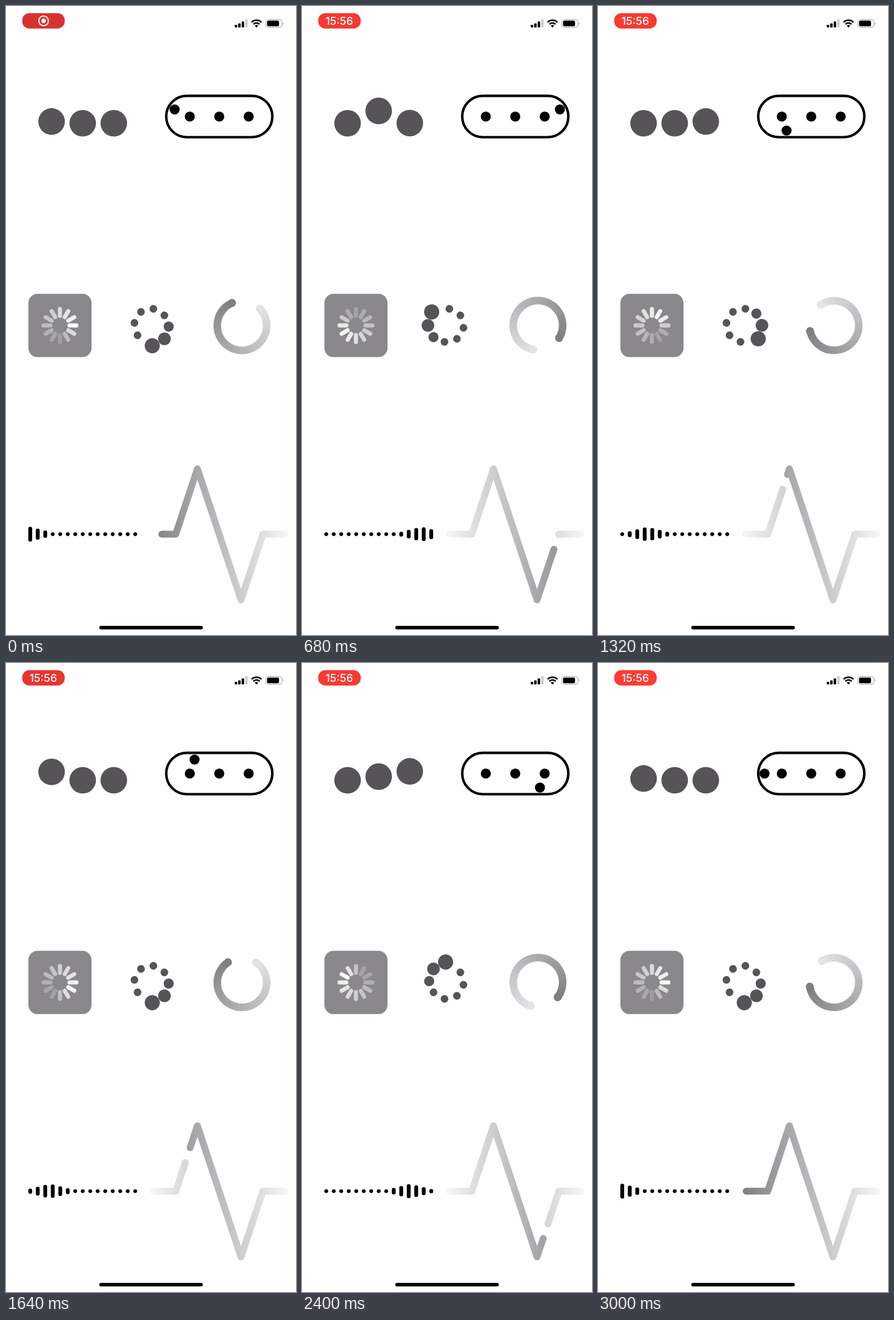
An HTML page without scripts for the animation above (3040 ms loop, 509 px wide and 1101 px high).

```html
<!DOCTYPE html>
<html lang="en">
<head>
<meta charset="utf-8">
<title>Loading indicators</title>
<style>
@property --t { syntax: "<number>"; inherits: true; initial-value: 0; }
/* Integers round, which gives floor() after subtracting a half */
@property --lap { syntax: "<integer>"; inherits: true; initial-value: 0; }
@property --tick { syntax: "<integer>"; inherits: true; initial-value: 0; }
@property --wrap { syntax: "<integer>"; inherits: false; initial-value: 0; }

html, body { margin: 0; width: 100%; height: 100%; overflow: hidden; background: #fefdff; }
body { position: relative; animation: clock 3.04s steps(76) -2ms infinite; }
@keyframes clock { to { --t: 3040; } }

svg {
  position: absolute; left: 0; top: 0; width: 509px; height: 1101px;
  --lap: calc(var(--t) / 1500 - .4999);
  --p: calc(var(--t) / 1500 - var(--lap));
  --tick: calc((var(--t) + 27) / 187.5 - .5);
  /* 0 to 1 and back */
  --swing: min(2 * var(--p), 2 - 2 * var(--p));
}

/* Status bar */
.pill { animation: glow 3.04s linear infinite; }
@keyframes glow {
  0%, 63% { fill: #d8322f; }
  13% { fill: #e93630; }
  30%, 100% { fill: #ff3b30; }
  43% { fill: #fa3930; }
  79% { fill: #f83930; }
}
.rec { animation: show 3.04s step-end infinite; }
.time {
  font: 500 19px Inter, "Liberation Sans", sans-serif;
  text-anchor: middle; fill: #fff;
  animation: show 3.04s step-end infinite reverse;
  animation: hide 3.04s step-end infinite;
}
@keyframes show { 0% { opacity: 1; } 6.58% { opacity: 0; } }
@keyframes hide { 0% { opacity: 0; } 6.58% { opacity: 1; } }

/* Bouncing balls */
.hop {
  cx: calc(80px + var(--i) * 54.6px); cy: 205.2px; r: 23.3px; fill: #565457;
  --x: calc(var(--p) * 1500 - var(--i) * 375 - 285);
  --gap: max(var(--x), -1 * var(--x));
  --d: min(var(--gap), 1500 - var(--gap), 377);
  transform: translateY(calc((1 + cos(var(--d) / 377 * 180deg)) * -10.85px));
}

/* Dot weaving around three others */
.weave {
  offset-path: path("M292.3 193.5A30.3 25.9 0 0 1 322.6 167.6A25.85 25.9 0 0 1 348.45 193.5A25.85 25.9 0 0 0 400.15 193.5A25.85 25.9 0 0 1 426 167.6A30.3 25.9 0 0 1 456.3 193.5A30.3 25.9 0 0 1 426 219.4A25.85 25.9 0 0 1 400.15 193.5A25.85 25.9 0 0 0 348.45 193.5A25.85 25.9 0 0 1 322.6 219.4A30.3 25.9 0 0 1 292.3 193.5Z");
  offset-rotate: 0deg;
  animation: weave 1.52s steps(38) -42ms infinite;
}
@keyframes weave { from { offset-distance: 0%; } to { offset-distance: 100%; } }

/* Petal spinner: slow fade out, quick fade in */
.petal {
  x: 13.3px; y: -3.6px; width: 19.2px; height: 7.2px; rx: 3.6px; fill: #fff;
  --wrap: calc(var(--p) - var(--i) / 12 - .4999);
  --q: calc(var(--p) - var(--i) / 12 - var(--wrap));
  transform: rotate(calc(var(--i) * 30deg));
  opacity: calc(.18 + .78 * max(1 - var(--q) / .75, var(--q) * 4 - 3));
}

/* Ring of dots: the head and two followers swell */
.bead {
  --wrap: calc((var(--tick) - var(--i)) / 8 - .45);
  --age: calc(var(--tick) - var(--i) - 8 * var(--wrap));
  --grow: max(0, 6.6 - 2.2 * var(--age));
  transform: rotate(calc(98.4deg + var(--i) * 45deg));
  cx: calc(29.3px + var(--grow) * .843px);
  cy: calc(var(--grow) * -1.135px);
  r: calc(6.7px + var(--grow) * 1px);
  fill: #565457;
}

/* Open ring */
.ring {
  position: absolute; left: 364.1px; top: 508.8px; width: 100.4px; height: 100.4px;
  border-radius: 50%;
  background:
    radial-gradient(circle, #fefdff 36.3px, transparent 37px),
    conic-gradient(from 90deg, transparent 70deg, #e3e2e4 70deg, #807e81 360deg);
  transform: rotate(calc(-113.7deg + var(--t) * .2128deg + max(0, var(--t) - 2400) * .0097deg));
}
.ring::before, .ring::after {
  content: ""; position: absolute; left: 43.3px; top: 43.3px;
  width: 13.8px; height: 13.8px; border-radius: 50%;
}
.ring::before { background: #807e81; transform: translateX(43.3px); }
.ring::after { background: #e3e2e4; transform: rotate(70deg) translateX(43.3px); }

/* Sound bars */
.bar {
  --x: calc(var(--swing) * 14 - var(--i));
  --h: calc(6.3 + 6.5 * max(0, 3 - max(var(--x), -1 * var(--x))));
  x: calc(39.2px + var(--i) * 13.16px); y: calc(924.5px - var(--h) * .5px);
  width: 6.7px; height: calc(var(--h) * 1px); rx: 3.2px;
}

/* Pulse line: two strokes either side of a travelling gap */
.pulse {
  fill: none; stroke-width: 12; stroke-linecap: round; stroke-linejoin: round;
  stroke-dasharray: 600 600;
  --mid: calc(var(--swing) * 560);
  --half: min(13.5, max(0, 3000 - var(--t)));
}
.before { stroke: url(#darken); stroke-dashoffset: calc(600px - (var(--mid) - var(--half)) * 1px); }
.after { stroke: url(#lighten); stroke-dashoffset: calc((var(--mid) + var(--half)) * -1px); }
</style>
</head>
<body>
<svg viewBox="0 0 509 1101">
  <defs>
    <linearGradient id="lighten" gradientUnits="userSpaceOnUse" x1="258" x2="491" y1="0" y2="0">
      <stop stop-color="#838184"/><stop offset="1" stop-color="#f4f3f5"/>
    </linearGradient>
    <linearGradient id="darken" gradientUnits="userSpaceOnUse" x1="258" x2="491" y1="0" y2="0">
      <stop stop-color="#f4f3f5"/><stop offset="1" stop-color="#838184"/>
    </linearGradient>
    <path id="beat" d="M260 924.5H298L336 810L412.5 1039.5L451 924.5H489"/>
  </defs>

  <rect class="pill" x="28.5" y="12.5" width="74.5" height="27" rx="12.5"/>
  <g class="rec">
    <circle cx="66" cy="26" r="8.4" fill="none" stroke="#fff" stroke-width="2"/>
    <circle cx="66" cy="26" r="3.9" fill="#fff"/>
  </g>
  <text class="time" x="65.5" y="32.8">15:56</text>

  <rect x="401.5" y="33" width="4.3" height="4.5" rx="1"/>
  <rect x="407.5" y="30.5" width="4.3" height="7" rx="1"/>
  <rect x="413.6" y="27" width="4.3" height="10.5" rx="1"/>
  <rect x="419.7" y="23" width="4.3" height="14.5" rx="1" fill="#cbcacc"/>
  <g fill="none" stroke="#000" stroke-width="2.8">
    <path d="M431.1 28.6A12 12 0 0 1 448.3 28.6"/>
    <path d="M434.3 32A7.5 7.5 0 0 1 445.1 32"/>
  </g>
  <path d="M439.7 37.8L436.6 34.6A4.6 4.6 0 0 1 442.8 34.6Z"/>
  <rect x="456.3" y="23.5" width="28" height="14" rx="4" fill="none" stroke="#a3a2a4"/>
  <rect x="458.2" y="25.4" width="21" height="10.2" rx="2.4"/>
  <path d="M486 28.2Q488.2 30.5 486 32.8Z" fill="#a3a2a4"/>

  <circle class="hop" style="--i:0"/>
  <circle class="hop" style="--i:1"/>
  <circle class="hop" style="--i:2"/>

  <rect x="281.2" y="157.2" width="186.3" height="72.4" rx="36.2" fill="none" stroke="#000" stroke-width="4.4"/>
  <circle cx="322.6" cy="193.5" r="8.8"/>
  <circle cx="374.3" cy="193.5" r="8.8"/>
  <circle cx="426" cy="193.5" r="8.8"/>
  <circle class="weave" r="8.8"/>

  <rect x="39.3" y="503.8" width="110.8" height="110.8" rx="16" fill="#8a888b"/>
  <g transform="translate(94.7 559.2)">
    <rect class="petal" style="--i:0"/><rect class="petal" style="--i:1"/>
    <rect class="petal" style="--i:2"/><rect class="petal" style="--i:3"/>
    <rect class="petal" style="--i:4"/><rect class="petal" style="--i:5"/>
    <rect class="petal" style="--i:6"/><rect class="petal" style="--i:7"/>
    <rect class="petal" style="--i:8"/><rect class="petal" style="--i:9"/>
    <rect class="petal" style="--i:10"/><rect class="petal" style="--i:11"/>
  </g>

  <g transform="translate(254.4 559)">
    <circle class="bead" style="--i:0"/><circle class="bead" style="--i:1"/>
    <circle class="bead" style="--i:2"/><circle class="bead" style="--i:3"/>
    <circle class="bead" style="--i:4"/><circle class="bead" style="--i:5"/>
    <circle class="bead" style="--i:6"/><circle class="bead" style="--i:7"/>
  </g>

  <rect class="bar" style="--i:0"/><rect class="bar" style="--i:1"/>
  <rect class="bar" style="--i:2"/><rect class="bar" style="--i:3"/>
  <rect class="bar" style="--i:4"/><rect class="bar" style="--i:5"/>
  <rect class="bar" style="--i:6"/><rect class="bar" style="--i:7"/>
  <rect class="bar" style="--i:8"/><rect class="bar" style="--i:9"/>
  <rect class="bar" style="--i:10"/><rect class="bar" style="--i:11"/>
  <rect class="bar" style="--i:12"/><rect class="bar" style="--i:13"/>
  <rect class="bar" style="--i:14"/>

  <use href="#beat" class="pulse before"/>
  <use href="#beat" class="pulse after"/>

  <rect x="163.7" y="1085" width="181.8" height="6.2" rx="3.1"/>
</svg>
<div class="ring"></div>
</body>
</html>
```
